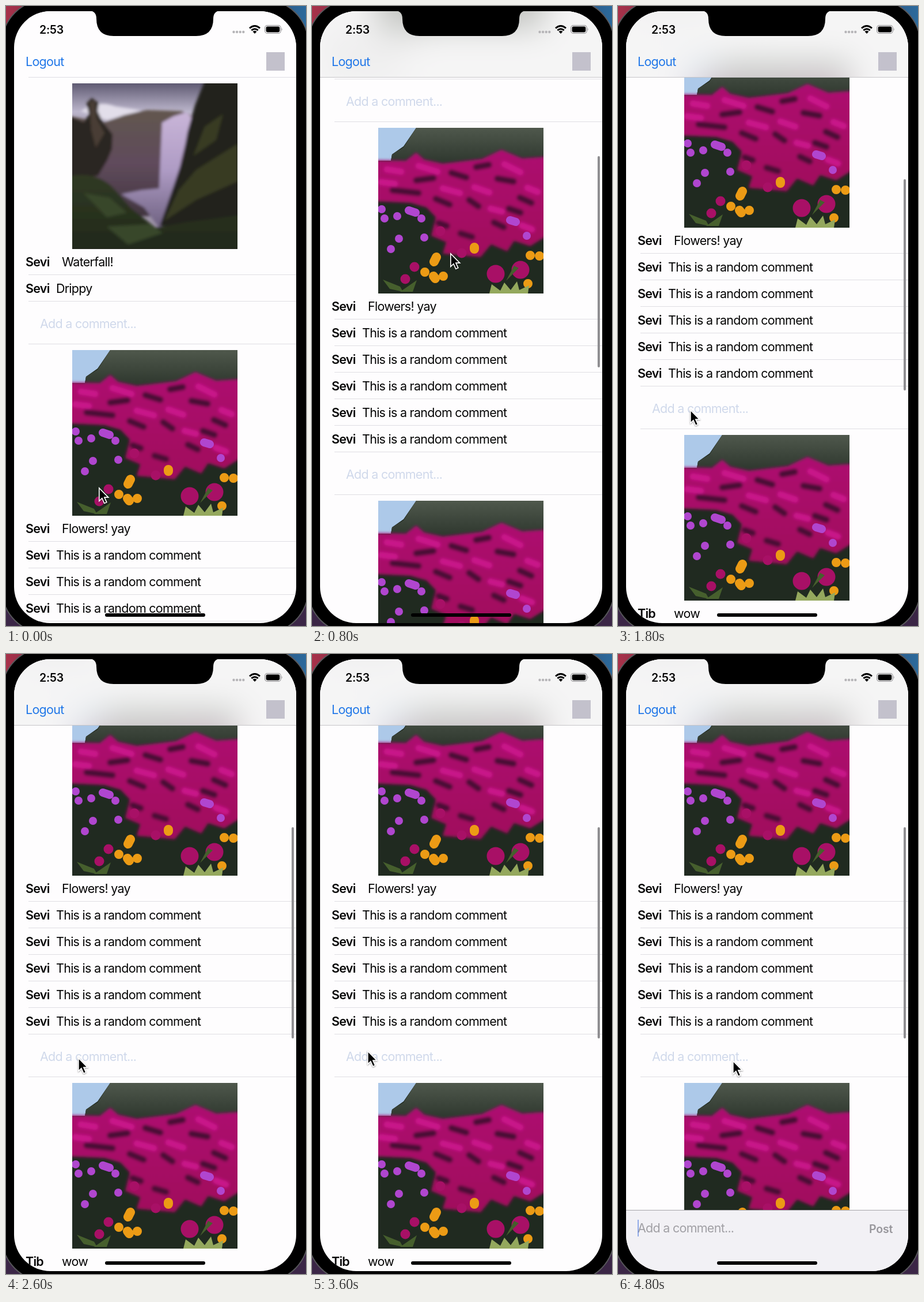
Recreate the animation shown at these times as an HTML page. Size 521 px wide and 1074 px high, loop 5 s.

```html
<!DOCTYPE html>
<html lang="en">
<head>
<meta charset="utf-8">
<title>Photo feed</title>
<style>
  html, body { margin: 0; width: 100%; height: 100%; overflow: hidden; }
  body { position: relative; background: linear-gradient(90deg, #a8324a, #30233f 40% 60%, #2c6a9c); font: 21.5px Inter, sans-serif; letter-spacing: -.034em; color: #050505; }
  body::before { content: ""; position: absolute; inset: 50% 0 0; background: #3b2646; }
  div, svg, b, span { position: absolute; white-space: pre; }
  b { font-weight: 600; }
  #phone { left: -8px; top: -12px; width: 530px; height: 1096px; border: 2px solid #57575a; border-radius: 78px; background: #000; }
  #screen { left: 13.5px; top: 8.5px; width: 490px; height: 1060px; border-radius: 63px; overflow: hidden; background: #fefdfe; }
  .page { left: -13.5px; top: -8.5px; width: 521px; height: 1074px; }
  .feed { left: 0; top: 124px; width: 521px; }
  .cell { position: relative; width: 521px; line-height: 46px; }
  .cell::after { content: ""; position: absolute; left: 39px; right: 0; bottom: 0; height: 1px; background: #dfdee3; }
  .photo { height: 342px; }
  .photo svg { left: 115px; top: 10px; }
  .comment { height: 46px; }
  .add { height: 74px; line-height: 74px; color: #d0d9eb; }
  .cell b, .cell span { left: 34px; bottom: 0; }
  .photo span { left: 97px; }
  .comment span { left: 87px; }
  .add span { left: 59px; bottom: -1px; }
  #header { left: 0; top: 0; width: 521px; height: 123px; overflow: hidden; border-bottom: 1px solid #c6c5c8; background: #fefdfe; }
  #header .feed { filter: blur(28px); }
  #header::after { content: ""; position: absolute; inset: 0; background: rgba(243, 243, 243, .74); }
  #header.top { border-color: #dfdee3; clip-path: inset(0 0 0 39px); }
  #header.top .feed, #header.top::after { display: none; }
  #logout { left: 34px; top: 83px; line-height: 26px; color: #2077e8; }
  #badge { left: 452px; top: 80px; width: 32px; height: 32px; background: #c3c1cc; }
  #thumb { left: 496px; width: 4px; height: 366px; border-radius: 2px; background: #8f8e91; }
  #bar { left: 0; top: 963px; width: 521px; height: 111px; border-top: 1.5px solid #a5a4a9; background: #f2f1f5; color: #a1a0a5; line-height: 30px; }
  #bar span { left: 34px; top: 15px; }
  #bar b { left: 436px; top: 17px; font-size: 19.5px; color: #98979c; letter-spacing: -.01em; }
  #caret { left: 34px; top: 16px; width: 2px; height: 29px; background: #4f7be0; }
  #clock { left: 58px; top: 28px; line-height: 26px; font-size: 19.5px; letter-spacing: -.01em; }
  #home { left: 172px; top: 1052px; width: 174px; height: 6px; border-radius: 3px; background: #000; }
  #cursor { left: 0; top: 0; overflow: visible; filter: drop-shadow(0 1px 1px #0006); }
</style>
</head>
<body>
<svg width="0" height="0">
  <defs>
    <linearGradient id="sky" x2="0" y2="1"><stop stop-color="#5f5a72"/><stop offset=".17" stop-color="#bbb5cb"/><stop offset=".3" stop-color="#9d93a6"/></linearGradient>
    <linearGradient id="hill" x2="0" y2="1"><stop stop-color="#62564e"/><stop offset=".5" stop-color="#604b5c"/><stop offset="1" stop-color="#41353f"/></linearGradient>
    <linearGradient id="fall" x2="0" y2="1"><stop stop-color="#c9b5d8"/><stop offset=".5" stop-color="#ae9bc4"/><stop offset="1" stop-color="#6d607f"/></linearGradient>
    <linearGradient id="grass" x2="0" y2="1"><stop stop-color="#303a23"/><stop offset="1" stop-color="#20271a"/></linearGradient>
    <linearGradient id="bush" x2="0" y2="1"><stop stop-color="#4f584c"/><stop offset="1" stop-color="#2a332a"/></linearGradient>
    <linearGradient id="bloom" x2="0" y2="1"><stop stop-color="#ad0f70"/><stop offset="1" stop-color="#a00b5c"/></linearGradient>
    <filter id="soft"><feGaussianBlur stdDeviation="2.5"/></filter>
  </defs>
  <symbol id="waterfall" viewBox="0 0 287 287">
    <path fill="url(#sky)" d="M0 0h287v287H0z"/>
    <g filter="url(#soft)">
      <path fill="#e2deea" d="M15 48Q45 28 75 40L120 47 60 64z"/>
      <path fill="url(#hill)" d="M-9 56L55 68 90 55 130 46 190 48 215 60V230H-9z"/>
      <path fill="url(#fall)" d="M156 68L176 57 198 50 208 60 190 130 178 190 152 252 125 215 85 192 120 185 151 182z"/>
      <path fill="#22231a" d="M296-9H232L213 38 200 85 192 130 176 178 152 247 296 250z"/>
      <path fill="#373b22" d="M287 105L250 128 215 150 185 185 160 238 215 202 287 170zM230 75l32-22-12 45-40 28z"/>
      <path fill="#2c2522" d="M-9 55L20 67 29 54 25 34 34 25 46 34 44 48 53 67 70 88 69 114 61 133 45 160-9 168z"/>
      <path fill="#4a3e34" d="M30 32l10-2 2 30 14 26-15 25-8-30z"/>
      <path fill="url(#grass)" d="M-9 162Q45 150 75 185L102 216 145 250 200 240 296 228V296H-9z"/>
      <path fill="#39462a" d="M20 190l45 8 30 26-35 8zM60 248l75-4 22 15-60 20z"/>
    </g>
  </symbol>
  <symbol id="flowers" viewBox="0 0 287 287" stroke-linecap="round" stroke-linejoin="round">
    <path fill="#202a20" d="M0 0h287v287H0z"/>
    <path fill="#adc9e9" d="M0 0H66L44 32 24 46 22 57H0z"/>
    <path fill="url(#bush)" d="M66 0H287V68H20L24 46 44 34z"/>
    <g filter="url(#soft)">
      <path fill="url(#bloom)" d="M-9 56L48 57 66 43 80 55 112 62 180 54 214 38 250 53 296 50V185L264 205 236 196 224 214 196 202 178 224 112 218 118 198 92 187 100 155 84 138 56 130-9 127z"/>
      <path stroke="#4a0e36" stroke-width="11" d="M25 108l45 5M66 91l30-4M127 78l26 8M100 123l24 10M158 125l16 11M170 68l22-4M207 88l28 5M246 121l20 9M201 164l17 8M143 183l20 6M227 140l20 7M105 165l14 5"/>
      <path stroke="#c9128a" stroke-width="11" d="M15 72l25 4M70 66l33 10M112 105l30 8M167 103l26 9M219 63l28 14M259 104l18 7M195 140l20 5M249 169l18 7M5 94l24 3"/>
    </g>
    <g stroke="#a81066">
      <path stroke-width="17" d="M47 262h0M63 241h0M108 179h0M145 217h0"/>
      <path stroke-width="31" d="M204 253h0M247 246h0"/>
    </g>
    <path stroke="#b046cf" stroke-width="14" d="M11 157h0M6 141h0M33 153h0M53 143l12 4M75 157h0M36 192h0M80 190h0M22 210h0M229 160l10 3M258 187h0"/>
    <path stroke="#ec9b15" stroke-width="16" d="M167 207l0 3M101 224l-4 8M81 250h0M96 257l3 4M113 257h0M264 221h0M280 222h0M260 270h0"/>
    <path fill="#465f2d" d="M8 263l30 12 5 9-23-5zM38 284l29-20-7 20zM222 265l14-26 8 4z"/>
    <path fill="#94a85d" d="M193 287l4-16 15 11 7-14 11 13 11-15 4 15 17-8-2 14z"/>
  </symbol>
</svg>

<div id="phone"></div>
<div id="screen"><div class="page">
  <div class="feed"></div>
  <div id="header"><div class="feed"></div></div>
  <span id="logout">Logout</span>
  <div id="badge"></div>
  <div id="thumb"></div>
  <div id="bar"><span>Add a comment...</span><div id="caret"></div><b>Post</b></div>
  <b id="clock">2:53</b>
  <div id="home"></div>
</div></div>

<svg width="521" height="70" style="left:0;top:0">
  <path d="M145 8q12 1 12 14 0 30 30 30H330q30 0 30-30 0-13 12-14z"/>
  <path stroke="#b6b5b8" stroke-width="4.4" stroke-linecap="round" d="M395.500 45h0m5.600 0h0m5.600 0h0m5.600 0h0"/>
  <g fill="none" stroke="#000" stroke-width="3"><path d="M423 38.500q9-8 18 0M426.300 42.200q5.700-5 11.400 0"/></g>
  <path d="M428.500 44.300q3.500-2.600 7 0L432 48z"/>
  <rect x="449.700" y="33.700" width="27.500" height="13.600" rx="4" fill="none" stroke="#99989b" stroke-width="1.300"/>
  <rect x="451.600" y="35.600" width="23.700" height="9.800" rx="2.400"/>
  <path fill="#99989b" d="M478.700 38q2 2.500 0 5z"/>
</svg>

<svg id="cursor" width="20" height="30">
  <path stroke="#fff" stroke-width="1.700" d="M.8 1V23.500l5-4.800 4 8.800 4-1.800-3.900-8.500h6.800z"/>
</svg>

<script>
  const $ = id => document.getElementById(id);
  const STEP = 200, LOOP = 5000;

  const cell = (kind, inner) => `<div class="cell ${kind}">${inner}</div>`;
  const line = (name, text) => `<b>${name}</b><span>${text}</span>`;
  const post = (image, name, caption, comments) =>
    cell('photo', `<svg width="287" height="287"><use href="#${image}"/></svg>` + line(name, caption)) +
    comments.map(text => cell('comment', line(name, text))).join('') +
    cell('add', '<span>Add a comment...</span>');

  // The second feed is the blurred one behind the header.
  const feeds = document.querySelectorAll('.feed');
  for (const feed of feeds) feed.innerHTML =
    post('waterfall', 'Sevi', 'Waterfall!', ['Drippy']) +
    post('flowers', 'Sevi', 'Flowers! yay', Array(5).fill('This is a random comment')) +
    post('flowers', 'Tib', 'wow', []);

  // Keys are [time, ...values], joined by straight lines.
  const scrollKeys = [[0, 0], [400, 0], [600, 201], [800, 385], [1000, 499]];
  const cursorKeys = [[0, 161, 834], [200, 161, 823], [400, 161, 823], [600, 184, 612], [800, 240, 428],
    [1000, 298, 314], [1200, 298, 314], [1800, 125, 699], [3000, 125, 699], [3600, 96, 687], [3800, 96, 687], [4400, 199, 704]];
  const barKeys = [[3800, 111], [4000, 45], [4200, 0]];

  function at(keys, time) {
    const next = keys.findIndex(key => key[0] > time);
    if (next < 1) return keys.at(next).slice(1);
    const a = keys[next - 1], b = keys[next];
    const k = (time - a[0]) / (b[0] - a[0]);
    return a.slice(1).map((value, i) => value + (b[i + 1] - value) * k);
  }

  function render(now) {
    const time = Math.floor(now % LOOP / STEP) * STEP;
    const [scroll] = at(scrollKeys, time);
    const [x, y] = at(cursorKeys, time);
    const [drop] = at(barKeys, time);

    for (const feed of feeds) feed.style.transform = `translateY(${-scroll}px)`;
    $('header').classList.toggle('top', scroll === 0);
    $('thumb').style.display = scroll ? '' : 'none';
    $('thumb').style.top = 127 + scroll * .346 + 'px';
    $('cursor').style.transform = `translate(${x}px, ${y}px)`;
    $('bar').style.transform = `translateY(${drop}px)`;
    $('caret').style.opacity = time === 4400 ? 0 : time === 4800 ? .6 : 1;
    requestAnimationFrame(render);
  }
  render(performance.now());
</script>
</body>
</html>
```
